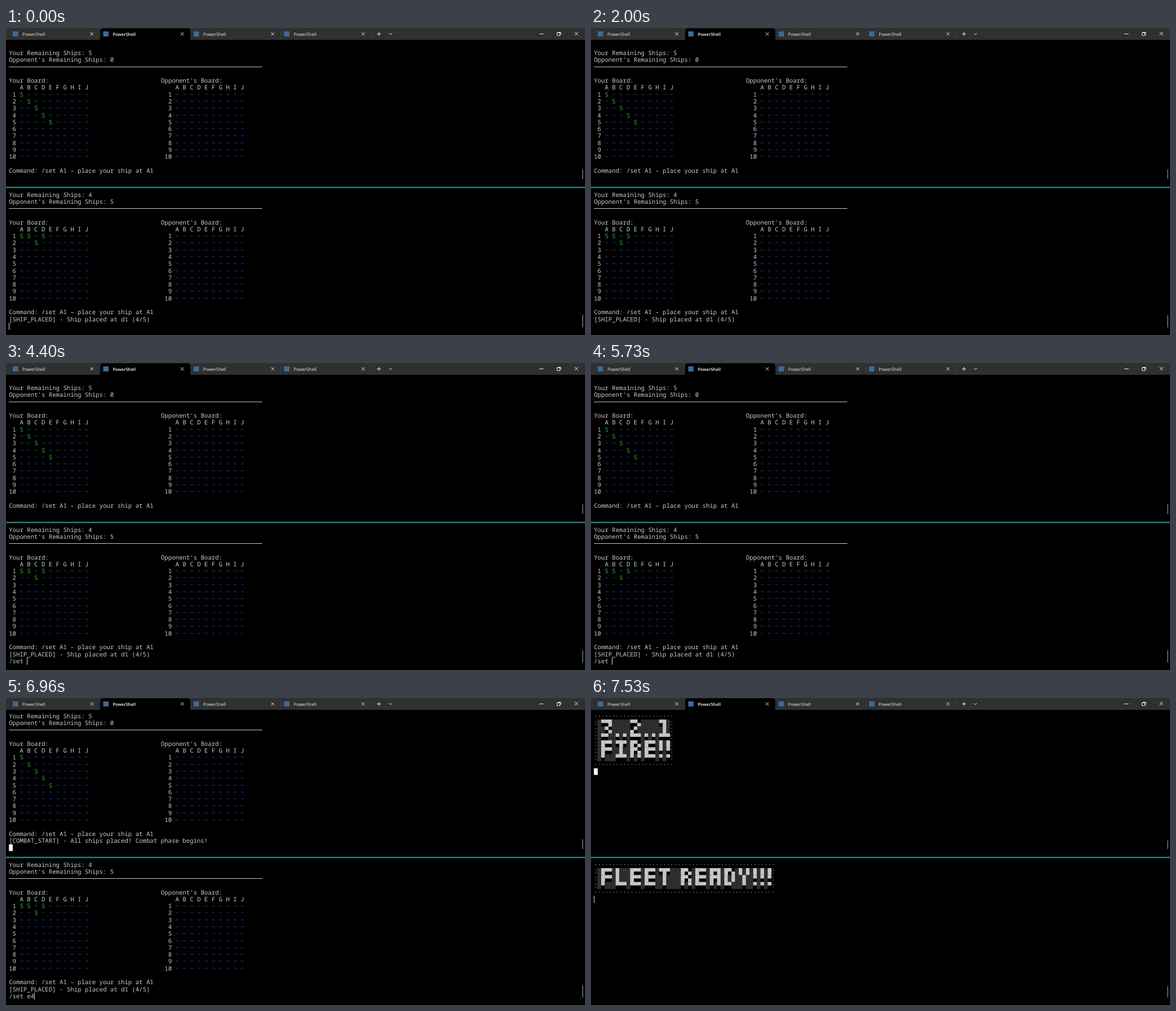
An HTML page with a canvas that plays this animation: 1027x545 px, repeating every 8000 ms.

```html
<!DOCTYPE html>
<html lang="en">
<head>
<meta charset="utf-8">
<title>Terminal battleship</title>
<style>
  html, body { margin: 0; width: 100%; height: 100%; overflow: hidden; background: #000; }
  canvas { display: block; }
</style>
</head>
<body>
<canvas id="stage" width="1027" height="545"></canvas>
<script>
const ctx = document.getElementById('stage').getContext('2d');
const LOOP = 8000, CELL = 6.42, ROW = 12.28, LEFT = 5.2;
const TOP_PANE = 26, BOTTOM_PANE = 289.7;
const MONO = '10.7px "Noto Sans Mono", monospace';
const TEXT = '#cccccc', SHIP = '#22c522', WATER = '#2545d0';

// Block lettering, three rows per glyph; rows are separated by "/".
const GLYPHS = {
  '1': '░▀█░/░░█░/░▀▀▀', '2': '░▀▀▄/░▄▀░/░▀▀▀', '3': '░▀▀█/░░▀▄/░▀▀░',
  '.': '░░/░░/░▀', '!': '░█/░▀/░▀', ' ': '░░/░░/░░',
  A: '░█▀█/░█▀█/░▀░▀', D: '░█▀▄/░█░█/░▀▀░', E: '░█▀▀/░█▀▀/░▀▀▀',
  F: '░█▀▀/░█▀▀/░▀░░', I: '░▀█▀/░░█░/░▀▀▀', L: '░█░░/░█░░/░▀▀▀',
  R: '░█▀▄/░█▀▄/░▀░▀', T: '░▀█▀/░░█░/░░▀░', Y: '░█░█/░░█░/░░▀░'
};

// Command line typing: [time, text]
const TYPING = [[0, ''], [3200, '/'], [3630, '/s'], [3830, '/se'], [4000, '/set'],
  [4400, '/set '], [6300, '/set e'], [6700, '/set e4']];
const CURSOR_OFF = [[500, 1060], [1630, 2200], [5400, 5600]];
const COMBAT_AT = 6960, BANNER_AT = 7000;

function rect(x, y, w, h, color) {
  ctx.fillStyle = color;
  ctx.fillRect(x, y, w, h);
}

function lines(color, width, ...paths) {
  ctx.strokeStyle = color;
  ctx.lineWidth = width;
  ctx.beginPath();
  for (const path of paths)
    path.forEach(([x, y], i) => i ? ctx.lineTo(x, y) : ctx.moveTo(x, y));
  ctx.stroke();
}

const cross = (x, y, r) =>
  lines('#eee', 1, [[x - r, y - r], [x + r, y + r]], [[x + r, y - r], [x - r, y + r]]);

function put(pane, row, col, text, color = TEXT) {
  ctx.font = MONO;
  ctx.fillStyle = color;
  ctx.fillText(text, LEFT + col * CELL, pane + row * ROW + 9.8);
}

function drawTabs() {
  rect(0, 0, 1027, 21, '#303030');
  ctx.fillStyle = '#000';
  ctx.beginPath();
  ctx.roundRect(167, 0.5, 160, 24, [5, 5, 0, 0]);
  ctx.fill();
  for (let i = 0; i < 4; i++) {
    const x = i * 160.4;
    rect(x + 12, 6, 9.5, 9, '#3d6b98');
    ctx.font = i === 1 ? '600 7.6px "Open Sans", sans-serif' : '7.8px "Open Sans", sans-serif';
    ctx.fillStyle = i === 1 ? '#fff' : '#eee';
    ctx.fillText('PowerShell', x + 29, 13.7);
    cross(x + 152.2, 10.5, 2.7);
  }
  rect(487, 5, 1, 11, '#444');
  rect(647, 5, 1, 11, '#444');
  lines('#eee', 1, [[658, 10.5], [665, 10.5]], [[661.5, 7], [661.5, 14]]);
  lines('#eee', 1, [[679.3, 9.2], [682, 11.8], [684.7, 9.2]]);
  lines('#eee', 1, [[946, 10.5], [953.5, 10.5]]);
  lines('#eee', 1, [[977.5, 8.5], [982.5, 8.5], [982.5, 13.5], [977.5, 13.5], [977.5, 8]],
    [[979, 7.5], [984, 7.5], [984, 12]]);
  cross(1011.7, 10, 3.2);
}

function drawGrid(pane, row, col, ships) {
  put(pane, row, col + 3, 'A B C D E F G H I J');
  for (let y = 1; y <= 10; y++) {
    put(pane, row + y, col, String(y).padStart(2));
    for (let x = 0; x < 10; x++) {
      const ship = ships.includes('ABCDEFGHIJ'[x] + y);
      put(pane, row + y, col + 3 + x * 2, ship ? 'S' : '~', ship ? SHIP : WATER);
    }
  }
}

function drawGame(pane, row, mine, theirs, ships) {
  put(pane, row, 0, `Your Remaining Ships: ${mine}`);
  put(pane, row + 1, 0, `Opponent's Remaining Ships: ${theirs}`);
  rect(LEFT, pane + (row + 2) * ROW + 5.7, 70 * CELL, 1, TEXT);
  put(pane, row + 4, 0, 'Your Board:');
  put(pane, row + 4, 42, "Opponent's Board:");
  drawGrid(pane, row + 5, 0, ships);
  drawGrid(pane, row + 5, 43, []);
  put(pane, row + 17, 0, 'Command: /set A1 – place your ship at A1');
}

function drawBlock(x, y, char) {
  const half = ROW / 2;
  if (char === '░') {
    rect(x, y, CELL + 0.3, ROW + 0.3, '#272727');
    for (let i = 0; i < 2; i++) rect(x + i * CELL / 2, y, 1.6, ROW + 0.3, '#353535');
  } else {
    const upper = char !== '▄', lower = char !== '▀';
    rect(x, y + (upper ? 0 : half), CELL + 0.3, upper && lower ? ROW + 0.3 : half, '#c6c6c6');
  }
}

function drawBanner(pane, words) {
  const art = words.flatMap(word =>
    [0, 1, 2].map(r => [...word].map(c => GLYPHS[c].split('/')[r]).join('')));
  const cols = art[0].length + 2;
  const dot = (col, y) => rect(LEFT + (col + 0.5) * CELL - 0.6, y - 0.6, 1.2, 1.2, '#bbb');
  for (let c = 0; c < cols; c++)
    for (const r of [0, art.length + 1]) dot(c, pane + r * ROW + 6);
  art.forEach((line, r) => {
    const y = pane + (r + 1) * ROW;
    for (const c of [0, cols - 1]) {
      dot(c, y + 4);
      dot(c, y + 9);
    }
    [...line].forEach((char, c) => drawBlock(LEFT + (c + 1) * CELL, y, char));
  });
}

const blockCursor = row => rect(LEFT, TOP_PANE + row * ROW + 0.5, CELL + 0.3, ROW - 0.5, '#fff');
const beamCursor = (row, col) =>
  rect(Math.round(LEFT + col * CELL), BOTTOM_PANE + row * ROW, 1, ROW + 0.3, '#ddd');

function drawPanes(t) {
  const diagonal = ['A1', 'B2', 'C3', 'D4', 'E5'];
  if (t >= BANNER_AT) {
    drawBanner(TOP_PANE, ['3..2..1', 'FIRE!!']);
    blockCursor(8);
    drawBanner(BOTTOM_PANE, ['FLEET READY!!!']);
    beamCursor(5, 0);
    return;
  }
  if (t >= COMBAT_AT) {
    drawGame(TOP_PANE, 0, 5, 0, diagonal);
    put(TOP_PANE, 18, 0, '[COMBAT_START] - All ships placed! Combat phase begins!');
    blockCursor(19);
  } else {
    drawGame(TOP_PANE, 1, 5, 0, diagonal);
  }
  drawGame(BOTTOM_PANE, 0, 4, 5, ['A1', 'B1', 'D1', 'C2']);
  put(BOTTOM_PANE, 18, 0, '[SHIP_PLACED] - Ship placed at d1 (4/5)');
  const typed = TYPING.findLast(([at]) => t >= at)[1];
  put(BOTTOM_PANE, 19, 0, typed);
  if (!CURSOR_OFF.some(([from, to]) => t >= from && t < to)) beamCursor(19, typed.length);
}

function drawFrame(now) {
  const t = now % LOOP, banner = t >= BANNER_AT;
  ctx.textRendering = 'geometricPrecision';
  rect(0, 0, 1027, 545, '#000');
  drawTabs();
  drawPanes(t);
  rect(0, 281.5, 1027, 3, '#123f40');
  rect(0, 282.4, 1027, 1.4, '#2c9a9a');
  const upper = banner ? 253 : 251, lower = banner ? 512 : t < 500 ? 509 : 510;
  rect(1022.3, upper, 1.2, 268 - upper, '#9a9a9a');
  rect(1022.3, lower, 1.2, 531.5 - lower, '#9a9a9a');
}

function tick() {
  drawFrame(performance.now());
  requestAnimationFrame(tick);
}
tick();
</script>
</body>
</html>
```
